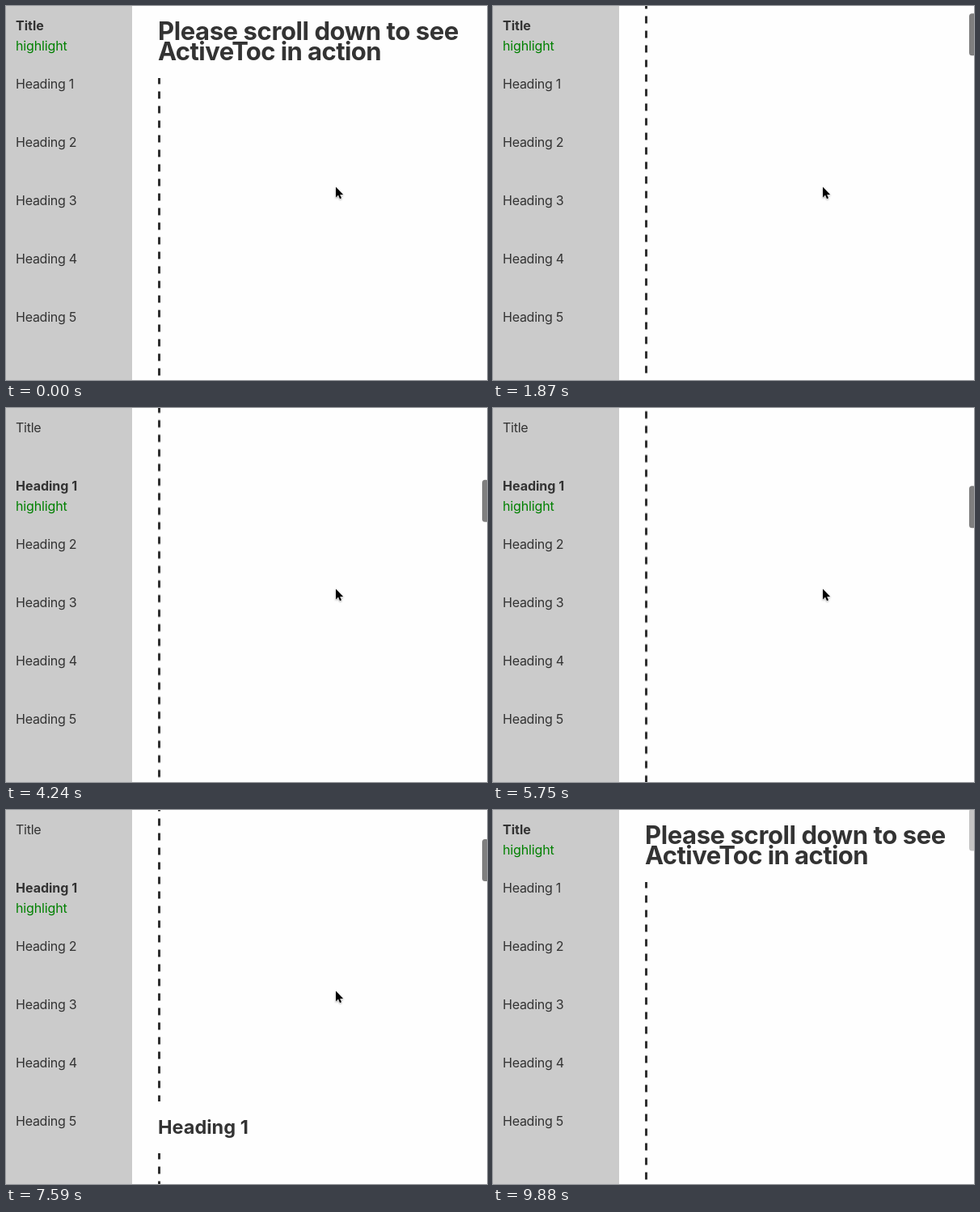
An HTML page for the animation above (9980 ms loop, 595 by 462 pixels).

```html
<!DOCTYPE html>
<html lang="en">
<head>
<meta charset="utf-8">
<title>ActiveToc</title>
<style>
  html, body { margin: 0; width: 100%; height: 100%; overflow: hidden; background: #fefefe; }
  body { position: relative; font: 16px/24px Inter, sans-serif; font-optical-sizing: none; color: #333; }
  #toc { position: absolute; inset: 0 auto 0 0; width: 156px; background: #cbcbcb; }
  #toc div { position: absolute; left: 12px; white-space: nowrap; letter-spacing: -.25px; }
  #toc .active { font-weight: 700; letter-spacing: 0; }
  #toc #mark { color: green; letter-spacing: -.13px; }
  #page { position: absolute; left: 188px; top: 0; will-change: transform; }
  h1, h2 { margin: 0; font-weight: 700; white-space: nowrap; }
  h1 { height: 71px; padding-top: 18px; font-size: 31px; line-height: 25px; letter-spacing: -.4px; }
  h1 span { letter-spacing: -.56px; }
  h2 { font-size: 23.5px; line-height: 64px; }
  .dash { width: 3px; height: 600px; background: linear-gradient(#2f2f2f 50%, transparent 50%) 0 -1.5px / 3px 18px repeat-y; }
  #bar { position: absolute; left: 589px; top: 0; width: 8px; height: 52px; border-radius: 3.5px; background: #7f7f7f; }
  #cursor { position: absolute; left: 0; top: 0; overflow: visible; filter: drop-shadow(0 1px 1px rgba(0, 0, 0, .35)); }
</style>
</head>
<body>
<div id="page"><h1>Please scroll down to see<br><span>ActiveToc in action</span></h1><div class="dash"></div></div>
<div id="toc"><div id="mark">highlight</div></div>
<div id="bar"></div>
<svg id="cursor" width="12" height="18"><path d="M.5 .5V13.4L3.5 10.6L5.5 15.2L7.5 14.3L5.6 9.9H9.6Z" stroke="#fff" paint-order="stroke"/></svg>
<script>
const LOOP = 9980;
const $ = id => document.getElementById(id);
const page = $('page'), toc = $('toc'), mark = $('mark'), bar = $('bar'), cursor = $('cursor');

// Each flick moves in equal time steps from where the last one ended
const flicks = [
  { start: 1170, end: 2220, steps: 13, to: 100.7 },
  { start: 2480, end: 3620, steps: 14, to: 563 },
  { start: 3800, end: 4950, steps: 14, to: 925.4 },
  { start: 5400, end: 6540, steps: 14, to: 789.2 },
  { start: 6810, end: 8910, steps: 25, to: 0 }
];
const leave = { start: 9080, end: 9340, steps: 4 };

// Document offset at which heading i becomes the active one
const threshold = i => 664 * i - 455;

const items = Array.from({ length: 6 }, (_, i) => {
  const label = i ? 'Heading ' + i : 'Title';
  const item = document.createElement('div');
  item.textContent = label;
  item.style.top = 12 + 72 * i + 'px';
  toc.append(item);
  if (i) page.insertAdjacentHTML('beforeend', `<h2>${label}</h2><div class="dash"></div>`);
  return item;
});

// Stepped progress from 0 to 1; the first step shows at the start time
function progress({ start, end, steps }, t) {
  if (t < start) return 0;
  const dt = (end - start) / (steps - 1);
  return Math.min(1, Math.floor((t - start) / dt + 1.12) / steps);
}

// Quick push, then long friction
const glide = u => 1 - (1 - u ** 1.5) ** 3;

const scrollAt = t => flicks.reduce((y, f) => y + (f.to - y) * glide(progress(f, t)), 0);

function draw(t) {
  const y = Math.round(scrollAt(t) * 2) / 2;
  page.style.transform = `translateY(${-y}px)`;

  const active = items.findLastIndex((_, i) => y > threshold(i));
  items.forEach((item, i) => item.classList.toggle('active', i === active));
  mark.style.top = 37 + 72 * active + 'px';

  bar.style.transform = `translateY(${y / 8.75 - 1.5}px)`;
  bar.style.opacity = t < 450 ? 0 : t < 9880 ? 1 : .45;

  const u = progress(leave, t);
  cursor.style.transform = `translate(${407.5 + 165 * u}px, ${223 + 267 * u}px)`;
  cursor.style.visibility = u < 1 ? 'visible' : 'hidden';
}

const begin = performance.now();
function tick() {
  draw((performance.now() - begin) % LOOP);
  requestAnimationFrame(tick);
}
tick();
</script>
</body>
</html>
```
